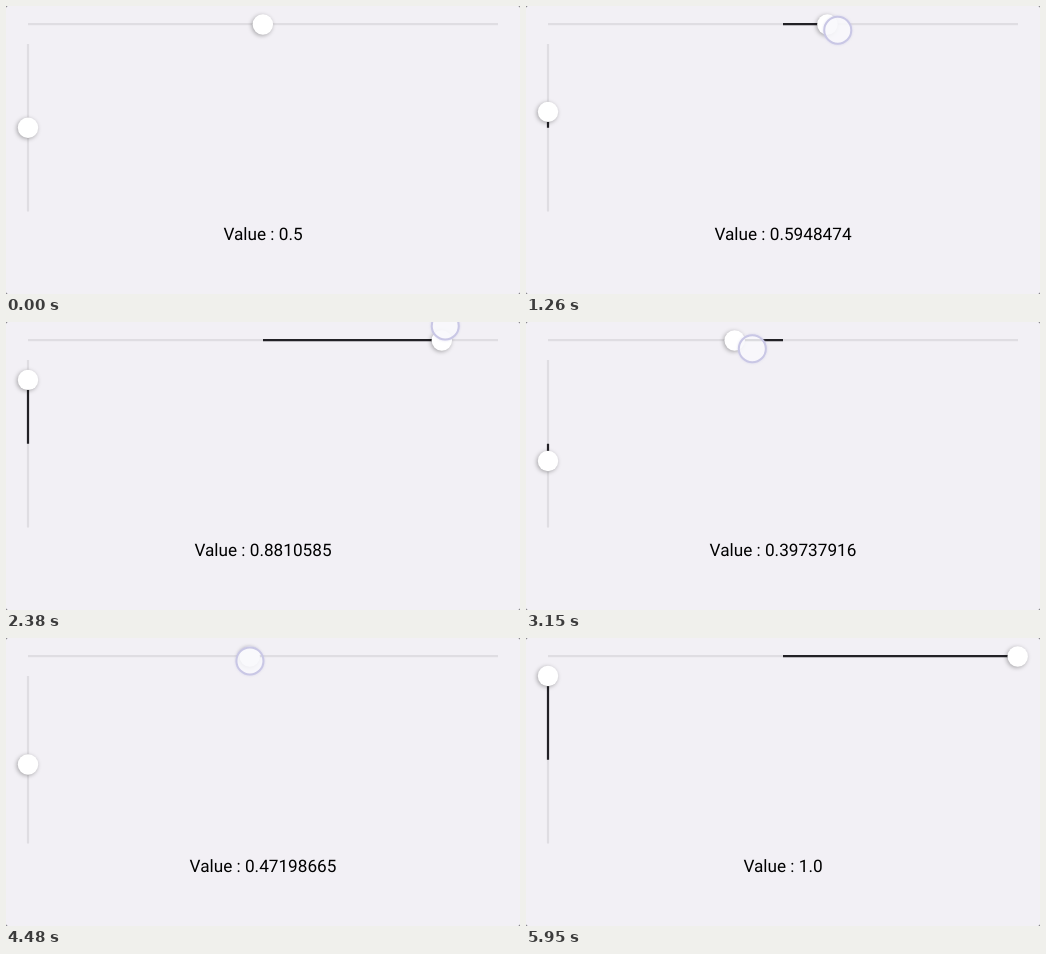
These frames come from a looping animation (514 by 288 pixels, 6.86 s). An HTML page:

```html
<!DOCTYPE html>
<html lang="en">
<head>
<meta charset="utf-8">
<title>Centered sliders</title>
<style>
  html, body { margin: 0; width: 100%; height: 100%; overflow: hidden; background: #55545a; }
  svg { display: block; width: 514px; height: 288px; background: #f2f0f5; border-radius: 2px; }
  line { stroke-width: 2.2; }
  .track { stroke: #dfdde2; }
  .active { stroke: #222126; }
  .thumb { fill: #fff; filter: drop-shadow(-.4px 1px 2.2px rgba(0, 0, 0, .32)); }
  #touch { fill: rgba(255, 255, 255, .78); stroke: #c9c7e5; stroke-width: 2; filter: drop-shadow(0 0 1px rgba(190, 188, 225, .5)); }
  text { font: 17.2px Roboto, Arial, sans-serif; fill: #000; text-anchor: middle; text-rendering: geometricPrecision; }
</style>
</head>
<body>
<svg viewBox="0 0 514 288">
  <line class="track" x1="22" y1="18.1" x2="492" y2="18.1"/>
  <line class="track" x1="22" y1="38" x2="22" y2="205.5"/>
  <line class="active" id="barH" x1="257" y1="18.1" x2="257" y2="18.1"/>
  <line class="active" id="barV" x1="22" y1="121.8" x2="22" y2="121.8"/>
  <circle class="thumb" id="thumbH" cx="257" cy="18.5" r="10.2"/>
  <circle class="thumb" id="thumbV" cx="22" cy="121.8" r="10.2"/>
  <text id="label" x="257" y="234">Value : 0.5</text>
  <circle id="touch" r="13.5"/>
</svg>
<script>
const LOOP = 6860, TICK = 70;
const PRESS = 350, FADE = 5810, RELEASE = 5950;
const LAG = 15; // the touch ring trails the thumb slightly

// Points of the drag: time, slider value, touch height, pause there.
const drag = [
  [420, 0.5, 22.5],
  [770, 0.6085556, 22],
  [980, 0.662, 21, 70],
  [1750, 0.3511083, 36],
  [2380, 0.8810585, 4],
  [2590, 0.936, 0, 70],
  [3570, -0.03, 48, 210],
  [3990, 0.077669725, 46],
  [5040, 0.85901314, -2],
  [5670, 1, -4]
];
const keys = drag.flatMap(([t, v, y, pause]) =>
  pause ? [[t, v, y], [t + pause, v, y]] : [[t, v, y]]);

const $ = id => document.getElementById(id);
const set = (id, attrs) => {
  for (const k in attrs) $(id).setAttribute(k, attrs[k]);
};

function secant(i, c) {
  const a = keys[i], b = keys[i + 1];
  return a && b ? (b[c] - a[c]) / (b[0] - a[0]) : 0;
}

// Harmonic mean keeps the curve from overshooting its keys.
function slope(i, c) {
  const p = secant(i - 1, c), q = secant(i, c);
  return p * q > 0 ? 2 * p * q / (p + q) : 0;
}

function sample(t, c) {
  const last = keys.length - 1;
  if (t <= keys[0][0]) return keys[0][c];
  if (t >= keys[last][0]) return keys[last][c];
  let i = 0;
  while (t >= keys[i + 1][0]) i++;
  const a = keys[i], b = keys[i + 1];
  const h = b[0] - a[0], u = (t - a[0]) / h, w = 1 - u;
  return a[c] * (1 + 2 * u) * w * w + b[c] * u * u * (3 - 2 * u)
    + h * u * w * (slope(i, c) * w - slope(i + 1, c) * u);
}

// Shortest decimal that still names the same 32-bit float.
function floatText(v) {
  if (Number.isInteger(v)) return v.toFixed(1);
  const f = Math.fround(v);
  let p = 1;
  while (p < 9 && Math.fround(+f.toPrecision(p)) !== f) p++;
  return String(+f.toPrecision(p));
}

function draw(t) {
  const v = Math.max(0, sample(t, 1));
  const x = 22 + 469.7 * v, y = 205.5 - 167.5 * v;
  set("barH", { x2: x });
  set("barV", { y2: y });
  set("thumbH", { cx: x });
  set("thumbV", { cy: y });
  $("label").textContent = "Value : " + floatText(v);
  set("touch", {
    cx: 28.5 + 469.7 * sample(t - LAG, 1),
    cy: sample(t, 2),
    opacity: t < PRESS || t >= RELEASE ? 0 : t < FADE ? 1 : 0.5
  });
}

const start = performance.now();
function frame() {
  const t = (performance.now() - start) % LOOP;
  draw(Math.floor(t / TICK) * TICK);
  requestAnimationFrame(frame);
}
frame();
</script>
</body>
</html>
```
